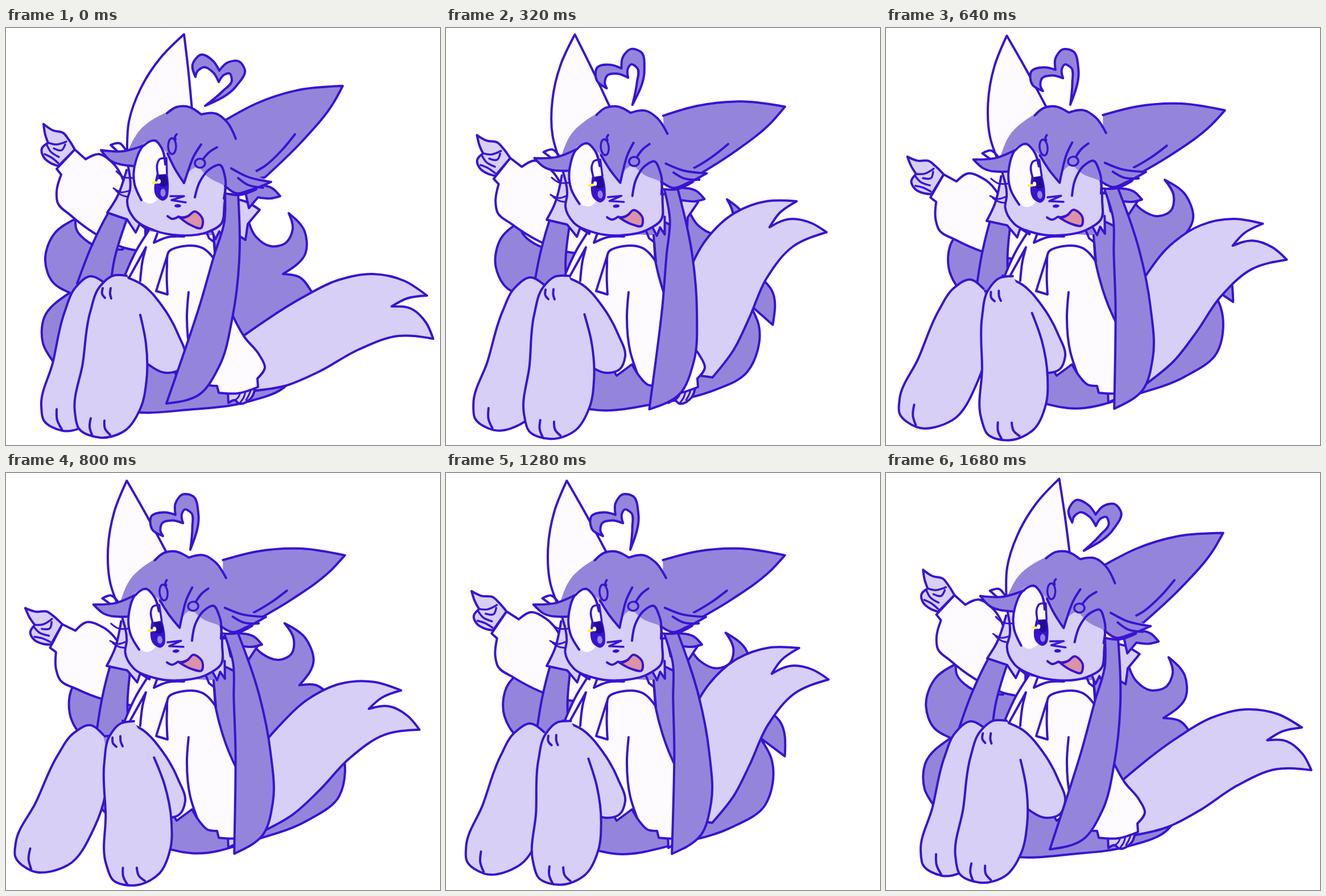
An HTML page for the animation above (1.76 s loop, 763x734 px).

```html
<!DOCTYPE html>
<html lang="en">
<head>
<meta charset="utf-8">
<title>Sway</title>
<style>
html, body { margin: 0; width: 100%; height: 100%; overflow: hidden; background: #fff; }
svg { display: block; width: 100%; height: 100%; }
path { vector-effect: non-scaling-stroke; }
</style>
</head>
<body>
<svg id="stage" viewBox="0 0 763 734" stroke-linejoin="round" stroke-linecap="round"></svg>
<script>
const INK = '#3913d2', PURPLE = '#9485db', PALE = '#d7cff6', WHITE = '#fefbff';
const STEP = 80, STEPS = 22;
const stage = document.getElementById('stage');
const rigs = [];

function node(name, parent, attrs) {
  const el = document.createElementNS('http://www.w3.org/2000/svg', name);
  for (const key in attrs) el.setAttribute(key, attrs[key]);
  return parent.appendChild(el);
}

// A layer turns about (x, y) and drifts by (dx, dy) as its track goes 0 to 1
function layer(track, deg, x, y, dx = 0, dy = 0) {
  const g = node('g', stage, {});
  if (track) rigs.push(at => {
    const t = at[track];
    g.setAttribute('transform', `translate(${dx * t} ${dy * t}) rotate(${deg * t} ${x} ${y})`);
  });
  return g;
}

// "x,y x,y! ..." is a smooth line through points; "!" marks a corner
const parse = s => s.split(' ').map(p => {
  const [x, y] = p.split(',').map(parseFloat);
  return { x, y, corner: p.endsWith('!') };
});
const dist = (a, b) => Math.hypot(b.x - a.x, b.y - a.y) || 1;
const mid = (a, b) => ({ x: (a.x + b.x) / 2, y: (a.y + b.y) / 2 });
const fmt = p => p.x.toFixed(1) + ' ' + p.y.toFixed(1);

function tangent(pts, i) {
  const a = pts[i - 1], p = pts[i], b = pts[i + 1];
  if (!a || !b || p.corner) return null;
  const d1 = dist(a, p), d2 = dist(p, b), s = d1 + d2;
  return {
    x: ((p.x - a.x) / d1 * d2 + (b.x - p.x) / d2 * d1) / s,
    y: ((p.y - a.y) / d1 * d2 + (b.y - p.y) / d2 * d1) / s
  };
}

function trace(pts) {
  let d = 'M' + fmt(pts[0]);
  for (let i = 1; i < pts.length; i++) {
    const a = pts[i - 1], b = pts[i], len = dist(a, b) / 3;
    const ta = tangent(pts, i - 1), tb = tangent(pts, i);
    let ca = ta && { x: a.x + ta.x * len, y: a.y + ta.y * len };
    let cb = tb && { x: b.x - tb.x * len, y: b.y - tb.y * len };
    if (!ca) ca = mid(a, cb || b);
    if (!cb) cb = mid(b, ca);
    d += `C${fmt(ca)} ${fmt(cb)} ${fmt(b)}`;
  }
  return d;
}

const shape = (g, fill, pts, stroke = INK, width = 4) =>
  node('path', g, { d: trace(parse(pts)), fill, stroke, 'stroke-width': width });
const lines = (g, width, ...list) => list.forEach(pts => shape(g, 'none', pts, INK, width));
const oval = (g, fill, cx, cy, rx, ry, stroke = 'none') =>
  node('ellipse', g, { cx, cy, rx, ry, fill, stroke, 'stroke-width': 3.5 });

// Back hair leans and shears as one sheet
const hair = layer();
shape(hair, PURPLE, '425,335! 440,368 465,384 492,378 504,354 497,326! 525,358 527,395 487,433! 515,438 540,468 555,490 549,551! 513,513! 524,550 493,629 420,659 330,671 200,671 85,590 65,555 67,510 112,466! 82,447 69,410 85,362 122,336! 124,355 145,377 205,390! 250,300! 425,335!');
rigs.push(({ hair: t }) => hair.setAttribute('transform',
  `matrix(${1 - .06 * t} ${-.2 * t} ${.33 * t} 1 ${-85 * t} ${38 * t})`));

// Tail bends more strongly near its root
const tail = shape(layer(), PALE, '420,540! 520,475 583,444 645,433 700,445 740,471! 705,476 678,490! 712,494 738,518 751,547! 690,542 620,566 550,605 490,630 430,639! 400,600!');
const tailPts = parse('420,540! 520,475 583,444 645,433 700,445 740,471! 705,476 678,490! 712,494 738,518 751,547! 690,542 620,566 550,605 490,630 430,639! 400,600!');
rigs.push(({ tail: t }) => tail.setAttribute('d', trace(tailPts.map(p => {
  const x = p.x - 420, y = p.y - 580;
  const a = -.654 * t * (1.3 - .3 * Math.hypot(x, y) / 330);
  const c = Math.cos(a), s = Math.sin(a);
  return { x: 420 + x * c - y * s, y: 580 + x * s + y * c, corner: p.corner };
}))));

const hand = layer();
shape(hand, PALE, '390,640! 391,660! 402,655 410,661 432,650 438,634!');
lines(hand, 3, '412,641 409,649 403,655', '421,640 418,650 412,659', '430,638 427,646 422,655');

const arm = layer('leg', -16, 300, 320);
shape(arm, PALE, '66,169! 82,180 101,185 110,196 121,214! 92,243! 79,238 66,227 63,212 74,202! 69,188 66,169!');
lines(arm, 3.5, '74,202 88,205 106,200', '72,206 78,217 93,227', '68,222 80,228 92,238', '104,205 98,215 84,212');
shape(arm, WHITE, '121,214! 140,231! 163,222 188,238 212,285! 245,330! 245,394! 205,386 155,361 114,330 91,308 89,288 97,258! 89,248! 121,214!');

const leftLock = layer('head', -12, 210, 275, -5, 0);
shape(leftLock, PURPLE, '213,275! 180,325 150,385 125,450! 183,460! 190,410 213,335!');

const shirt = layer();
shape(shirt, WHITE, '250,358! 230,390 205,445! 300,612! 327,592! 340,613 355,628 371,630! 374,642! 408,643 443,632! 442,617! 455,598 445,575 420,545 398,505 375,440 368,410! 365,365!');
lines(shirt, 4,
  '266,362! 260,378! 285,368 313,367',
  '216,440! 246,386! 240,410 236,445',
  '285,396! 264,463! 284,469! 283,420 286,394 312,384 345,387 369,411',
  '321,465 318,510 324,570 336,607',
  '352,358! 357,370! 366,377! 369,411');

const backLeg = layer('leg', 12, 148, 437, 0, 7);
shape(backLeg, PALE, '174,449 148,437 122,457 103,500 82,590 62,665 66,690 100,709 160,686 192,611 199,552 188,483');
lines(backLeg, 4, '89,671 90,690 98,706');
shape(layer(), PALE, '205,436! 240,452 275,490 303,540 315,578 305,601 285,607 247,590! 220,500! 205,436!');
const frontLeg = layer('leg', -10, 200, 434, 13, 3);
shape(frontLeg, PALE, '236,505! 246,555 247,620 237,668 210,708 165,721 128,705 121,675 135,590 148,500 165,455 188,436 212,436');
lines(frontLeg, 4, '149,687 147,702 152,718', '173,691 174,705 183,716', '170,458 169,468 174,475', '184,458 183,468 185,476');

shape(layer('head', -23, 270, 178, -32, 6), WHITE, '213,215! 216,165 236,108 272,52 313,11! 320,70 328,155!');
const rightEar = layer('head', 14, 420, 213, -18, -2);
shape(rightEar, PURPLE, '386,162! 440,133 515,109 592,102! 575,133 520,200 455,263! 412,268!');
lines(rightEar, 4, '508,187 485,215 455,243 430,257');
shape(layer('head', -45, 350, 137, -26, -2), PURPLE, '333,86! 328,64 343,47 364,58 375,75! 389,61 410,59 420,74 405,102 350,137! 380,112 397,92 393,80 384,82 374,95! 364,78 348,69 336,77 333,86!');

// Every part of the head tilts together
const headLayer = () => layer('head', -6.5, 300, 270, -8, 1);
const back = headLayer();
shape(back, PALE, '212,250! 195,298 178,325! 213,337! 228,360! 235,345! 250,357! 270,300!');
shape(back, PALE, '385,300! 420,305 446,320! 425,345! 421,373! 385,350!');
shape(back, PALE, '360,352! 368,372! 375,358! 382,371! 385,340!');
shape(layer('head', 0, 0, 0, -32, 6), PURPLE, '420,285! 427,317! 443,298! 465,300 482,296! 468,282 440,276!');
shape(headLayer(), PALE, '214,240! 218,285 213,305 225,335 260,356 305,365 352,360 378,345 384,310 385,240! 300,200!');

const rightLock = layer('lock', -18, 396, 290, -1, -8);
shape(rightLock, PURPLE, '385,290! 384,340 366,400 340,490 310,580 282,661! 340,645 375,595 398,510 410,410 408,290!');

const head = headLayer();
shape(head, PURPLE, '215,215! 235,180 283,148 316,137 343,152! 370,151 389,166 404,194! 445,262! 466,271! 440,285 405,291 383,277 355,262 338,243! 323,252 313,273! 297,248 284,220! 262,200! 235,230 225,242! 190,235 167,215! 190,219 215,215!', 'none');

oval(head, WHITE, 253, 254, 28, 55);
shape(head, INK, '266,256! 283,256! 285,285 282,299 275,303 268,299 266,256!', INK, 2);
shape(head, '#240a98', '270,258! 281,258! 282,278 271,278 270,258!', 'none');
oval(head, PURPLE, 276, 290, 4.5, 7);
shape(head, WHITE, '267,258! 267,236 270,231 282,229! 283,257!', INK, 3.5);
oval(head, '#fff13a', 262, 272, 6, 2.5);
oval(head, '#fff', 269, 270, 3, 4);

lines(head, 4,
  '238,303 226,275 228,235 243,206 262,198 274,212 280,240',
  '283,150 300,139 318,138 343,152! 370,151 389,166 404,195',
  '244,206 205,217 167,215! 182,232 225,243',
  '210,214 200,203 184,206! 196,217',
  '284,221 297,248 313,273! 320,252 330,226 343,205',
  '347,230 358,218 371,210',
  '298,196 297,192 300,187',
  '396,247 425,262 466,271! 430,285 405,291 385,278',
  '408,264 425,276 452,281',
  '385,291 410,294 440,284',
  '332,298 341,270 360,247 376,241 385,262 383,300');
lines(head, 3, '194,252 206,262 224,264', '189,282 202,289 218,286', '193,286 203,294 213,297');
oval(head, PURPLE, 292, 208, 7, 14, INK);
oval(head, PURPLE, 341, 238, 9, 8, INK);

lines(head, 3.5, '289,296! 313,296! 291,303! 316,307!');
oval(head, INK, 302, 313, 6, 3);
shape(head, '#db93a5', '306,334! 320,331 331,323 346,338 343,352 325,347 306,334!');
lines(head, 4, '284,331 292,336 303,332! 312,334 322,330');

const ease = (n, span) => (1 - Math.cos(Math.PI * Math.min(Math.max(n, 0), span) / span)) / 2;

// The loop plays out and back; each part settles at its own pace
function pose(step) {
  const n = Math.min(step, STEPS - step);
  const at = {
    head: ease(n, 5.3),
    lock: ease(n, 6.8),
    hair: ease(n, 9.2),
    leg: ease(n, 11),
    tail: ease(n, 4.6) - .58 * ease(n - 4.6, 6.4)
  };
  rigs.forEach(rig => rig(at));
}

let shown = -1;
function tick() {
  const step = Math.floor(performance.now() / STEP) % STEPS;
  if (step !== shown) pose(shown = step);
  requestAnimationFrame(tick);
}
tick();
</script>
</body>
</html>
```
